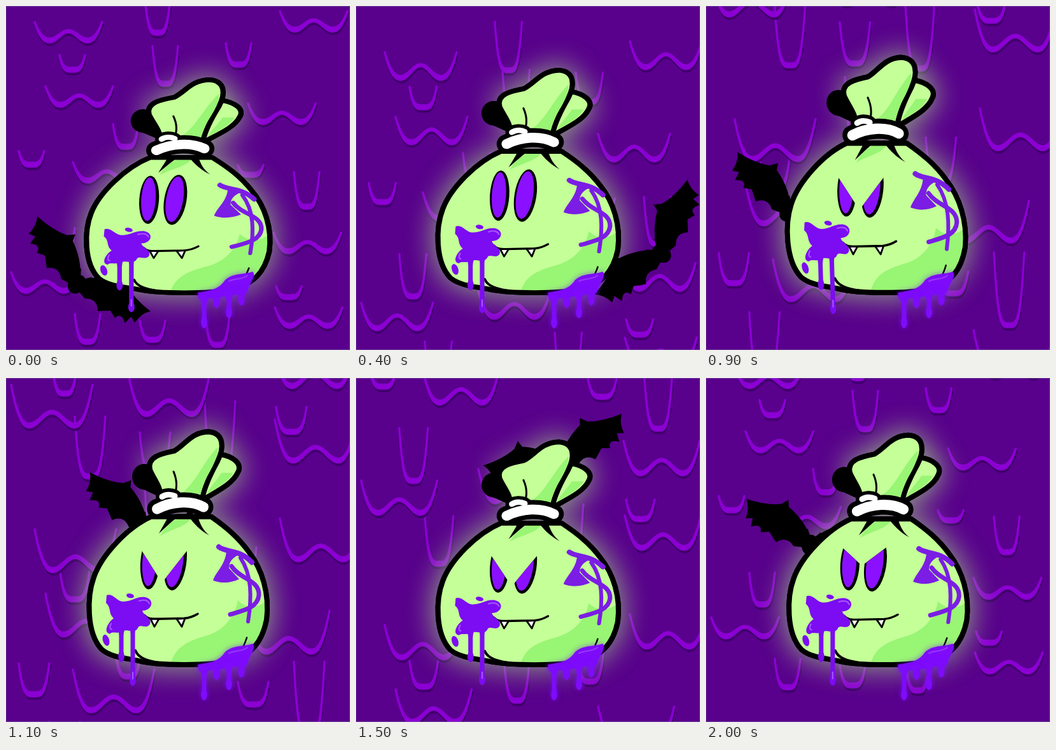
Animation of 540 by 540 pixels, one loop 2100 ms. Source, as an HTML page with a canvas:

```html
<!DOCTYPE html>
<html lang="en">
<head>
<meta charset="utf-8">
<title>Slimy money bag</title>
<style>
html, body { margin: 0; width: 100%; height: 100%; overflow: hidden; background: #59008d; }
canvas { display: block; width: 100vw; height: 100vh; }
</style>
</head>
<body>
<canvas id="stage" width="540" height="540"></canvas>
<script>
const ctx = document.getElementById('stage').getContext('2d');
const LOOP = 2100, STEP = 100, PERIOD = 620, FLOOR = 453;
const LIGHT = '#c4ff98', SHADE = '#99f574', SLIME = '#7c0cf2', GLOSS = '#a553ff';

const clamp = v => Math.max(0, Math.min(1, v));
const ramp = (t, a, b) => clamp((t - a) / (b - a));

// Main poses of the bag and the bat; between them everything moves evenly.
const POSES = [
  { t: 0, tall: 0.924, x: 115, y: 432, roll: 40 },
  { t: 400, tall: 0.965, x: 475, y: 385, roll: -51 },
  { t: 700, tall: 1, x: 368, y: 256, roll: -16 },
  { t: 900, tall: 1.02, x: 132, y: 318, roll: 30 },
  { t: 1300, tall: 1, x: 310, y: 142, roll: 21 },
  { t: 1700, tall: 0.932, x: 332, y: 118, roll: -62 },
  { t: 2000, tall: 0.995, x: 165, y: 256, roll: 16 }
];
function poseAt(t) {
  const i = POSES.findLastIndex(p => p.t <= t);
  const a = POSES[i], b = POSES[i + 1] || { ...POSES[0], t: LOOP };
  const k = ramp(t, a.t, b.t), mix = n => a[n] + (b[n] - a[n]) * k;
  return { tall: mix('tall'), x: mix('x'), y: mix('y'), roll: mix('roll') };
}
const anger = t => ramp(t, 400, 885) * (1 - ramp(t, 1850, 2250));
const lean = t => -11 * clamp(1 - Math.abs(t - 900) / 200);

function paint(d, fill, line, width) {
  const p = new Path2D(d);
  if (fill) { ctx.fillStyle = fill; ctx.fill(p); }
  if (line) { ctx.strokeStyle = line; ctx.lineWidth = width; ctx.stroke(p); }
}
function oval(x, y, rx, ry, fill, turn = 0) {
  ctx.beginPath();
  ctx.ellipse(x, y, rx, ry, turn, 0, 7);
  ctx.fillStyle = fill;
  ctx.fill();
}
// A hanging drop: wide root, thin neck, round end.
function hang(x, top, end, w, fill) {
  const n = w * 0.32;
  paint(`M${x - w} ${top} Q${x - n} ${top + 6} ${x - n} ${top + 18} L${x - n} ${end - 6} ` +
    `H${x + n} L${x + n} ${top + 18} Q${x + n} ${top + 6} ${x + w} ${top} Z`, fill);
  oval(x, end - 9, n + 1.3, 9, fill);
}

// Bottom left corners of the wall drips when the loop starts.
const CUPS = [[218, 45], [345, 95], [84, 103], [230, 125], [20, 252], [168, 224], [452, 318],
  [364, 268], [68, 400], [108, 530], [424, 460], [312, 535], [210, 527]];
const WAVES = [[45, 57], [430, 40], [62, 158], [380, 185], [105, 277], [420, 388], [8, 450],
  [422, 505], [192, 432]];

function rise(u, wave, h) {
  if (!wave) return h * Math.abs(2 * u - 1) ** 4;
  const side = Math.abs(2 * u - 1);
  return side > 0.55 ? h * ((side - 0.55) / 0.45) ** 2.4
    : Math.min(h * 0.5, 22) * Math.cos(side / 0.55 * Math.PI / 2) ** 2;
}
function drip(x, w, y, h, wave) {
  if (y < -8 || y - h > 548) return;
  const N = 44, p = new Path2D();
  const at = i => rise(i / N, wave, h);
  for (let i = 0; i <= N; i++) p.lineTo(x + w * i / N, y - at(i));
  for (let i = N; i >= 0; i--) p.lineTo(x + w * i / N, y - at(i) - 6 * clamp(1 - at(i) / h));
  p.closePath();
  const coat = (color, dx, dy) => {
    ctx.save();
    ctx.translate(dx, dy);
    ctx.fillStyle = ctx.strokeStyle = color;
    ctx.lineWidth = 3.4;
    ctx.fill(p);
    ctx.stroke(p);
    ctx.restore();
  };
  coat('#41006c', 1, 4);
  coat('#8b00d3', 0, 0);
}
function wall(t) {
  ctx.fillStyle = '#59008d';
  ctx.fillRect(0, 0, 540, 540);
  const u = t / LOOP, fall = PERIOD * u ** 1.42, pull = Math.sin(Math.PI * u) ** 2;
  [CUPS, WAVES].forEach((set, wave) => set.forEach(([x, y], i) => {
    const w = wave ? 106 + 22 * pull : 40 + 8 * pull;
    const h = (wave ? 32 : 40 + 22 * Math.sin(i * 2.3 + 1)) * (1 + 1.1 * pull);
    for (const lift of [0, PERIOD]) drip(x, w, y + fall - lift, h, wave);
  }));
}

const WING = 'M-.1 .04 Q.2 -.13 .58 -.06 L.66 -.12 L.68 0 Q.8 .18 1.05 .34 Q.92 .38 .84 .52 ' +
  'L.78 .44 L.7 .54 Q.64 .38 .55 .48 L.48 .38 L.3 .4 Q.28 .22 .1 .24 Z';
function bat({ x, y, roll }) {
  ctx.save();
  ctx.translate(x, y);
  ctx.rotate(roll * Math.PI / 180);
  for (const side of [-1, 1]) {
    ctx.save();
    ctx.scale(110 * side, 110);
    ctx.rotate(-35 * Math.PI / 180);
    paint(WING, '#000');
    ctx.restore();
  }
  oval(0, 6, 13, 16, '#000');
  paint('M-13 4 L-11 -18 L-4 -8 H4 L11 -18 L13 4 Z', '#000');
  ctx.restore();
}

const BODY = 'M228 220 C190 237 150 280 138 314 C127 344 126 400 150 426 C165 439 190 440 208 444 ' +
  'C240 452 320 452 350 444 C385 436 402 415 409 380 C414 340 402 302 382 276 C365 252 345 236 322 220 Z';
const TUFT = 'M243 192 C244 174 232 162 226 147 C221 127 244 122 264 118 C282 108 290 89 318 88 ' +
  'C342 90 343 112 332 134 C322 152 312 172 308 192 Z';
const FLAP = 'M336 123 C356 126 372 138 364 151 C356 169 332 180 312 192 L298 192 Z';

function glow() {
  ctx.save();
  ctx.shadowColor = 'rgba(175,255,130,.68)';
  ctx.shadowBlur = 46;
  const p = new Path2D(BODY);
  p.addPath(new Path2D(TUFT));
  p.addPath(new Path2D(FLAP));
  ctx.fillStyle = ctx.strokeStyle = '#000';
  ctx.lineWidth = 8;
  ctx.fill(p);
  ctx.stroke(p);
  ctx.restore();
}
function knot() {
  oval(217, 158, 19, 20, '#000');
  paint('M208 174 L242 190 L238 150 Z', '#000');
  paint(FLAP, LIGHT, '#000', 8);
  paint('M338 152 C330 165 320 174 316 184 C334 174 348 166 356 152 Z', SHADE);
  paint(TUFT, LIGHT, '#000', 8);
  paint('M270 188 C298 170 306 140 332 112 C334 128 322 146 314 161 C309 172 306 180 304 190 Z', SHADE);
  paint('M263 150 C269 164 269 176 264 188', null, '#000', 3);
}
function band() {
  const top = 'M245 189 C251 185 259 185 265 188';
  const ring = 'M237 208 C260 196 290 194 310 205';
  paint(top, null, '#000', 20);
  paint(ring, null, '#000', 31);
  paint(top, null, '#fff', 9);
  paint(ring, null, '#fff', 16);
}

function eye(x, rx, ry, turn, lid) {
  ctx.save();
  if (lid) ctx.clip(new Path2D(lid));
  oval(x, 292, rx + 3, ry + 3, '#000', turn);
  oval(x - 1, 291, rx - 1, ry - 1, '#8b10ff', turn);
  ctx.restore();
}
function face(mood) {
  const inner = 246 + 74 * mood, outer = 250 + 18 * mood;
  const lid = (a, b) => mood && `M${a} ${outer} L${b} ${inner} V360 H${a} Z`;
  eye(226, 12, 38, 0.06, lid(210, 243));
  eye(266, 14, 40, 0.15, lid(288, 247));
  paint('M217 373 C222 379 228 379 236 379 L280 378 C290 377 296 374 301 371', null, '#000', 3.4);
  paint('M227 379 L233 391 L240 379 Z M268 379 L276 391 L281 378 Z', '#fff', '#000', 2.8);
}

function dollar() {
  const c = '#7b1de4';
  paint('M346 274 C344 295 330 305 325 319 C340 325 355 322 366 317 L350 300 C350 290 356 284 364 280 Z', c);
  paint('M334 267 C345 276 366 270 386 291', null, c, 8);
  paint('M354 297 C368 318 398 318 397 342 C395 362 372 366 352 372', null, c, 7);
  paint('M368 284 C386 310 386 345 380 383', null, c, 6);
}
function splat() {
  hang(181, 388, 446, 11, SLIME);
  hang(199, 384, 483, 11, SLIME);
  paint('M158 342 C168 338 174 352 184 352 C198 352 204 344 218 345 C234 348 230 366 214 366 ' +
    'C216 374 230 378 226 387 C221 396 210 385 207 393 C202 403 188 393 181 399 ' +
    'C172 402 168 398 163 402 C152 400 160 384 169 378 C160 370 166 362 157 354 Z', SLIME);
  oval(157, 412, 5, 9, SLIME, -0.3);
  oval(195, 343, 6, 3.5, SLIME, 0.2);
  paint('M209 351 C217 348 223 350 225 355 M165 386 C162 391 163 395 166 395 M199 462 V472', null, GLOSS, 2.2);
}
function puddle() {
  const c = '#7e0cfa';
  ctx.save();
  ctx.shadowColor = 'rgba(125,12,255,.6)';
  ctx.shadowBlur = 8;
  paint('M301 450 C318 447 334 446 344 430 C358 418 376 422 387 417 C394 424 382 434 378 450 ' +
    'C360 452 340 458 303 460 Z', c);
  [506, 474, 490, 470].forEach((end, i) => hang(311 + 19.5 * i, 454 - 3 * i, end, 11, c));
  ctx.restore();
  paint('M350 432 C360 427 370 430 379 423', null, '#9838ff', 2);
}

function bag(t) {
  knot();
  paint(BODY, LIGHT);
  ctx.save();
  ctx.clip(new Path2D(BODY));
  paint('M258 452 C264 420 290 412 318 404 C346 394 360 372 364 350 C380 366 398 362 416 345 V452 Z', SHADE);
  paint('M242 250 C252 230 270 219 293 219 C285 236 262 238 242 250 Z', SHADE);
  paint('M256 216 L274 218 C263 224 254 234 240 246 C248 232 252 226 256 216 Z', '#000');
  paint('M284 216 L300 216 C304 230 308 240 319 249 C304 241 294 230 284 216 Z', '#000');
  ctx.restore();
  paint(BODY, null, '#000', 8);
  paint('M203 428 C208 440 222 444 240 447', null, '#000', 4);
  paint('M378 408 C374 420 371 426 362 434', null, '#000', 2.5);
  band();
  dollar();
  face(anger(t));
  splat();
}

// Squash and lean, standing on the floor line.
function squash(t, sy) {
  const sx = 1 + 0.4 * Math.max(0, 1 - sy), q = lean(t) / 369;
  ctx.transform(sx, 0, -q, sy, 270 * (1 - sx) + q * FLOOR, FLOOR * (1 - sy));
}
function draw(t) {
  const pose = poseAt(t);
  wall(t);
  ctx.save();
  squash(t, pose.tall);
  glow();
  ctx.restore();
  bat(pose);
  ctx.save();
  squash(t, pose.tall);
  bag(t);
  ctx.restore();
  puddle();
  ctx.strokeStyle = 'rgba(125,105,160,.6)';
  ctx.lineWidth = 1;
  ctx.strokeRect(0.5, 0.5, 539, 539);
}

ctx.lineCap = ctx.lineJoin = 'round';
const start = performance.now();
function tick() {
  const t = (performance.now() - start) % LOOP;
  draw(Math.floor(t / STEP) * STEP);
  requestAnimationFrame(tick);
}
tick();
</script>
</body>
</html>
```
